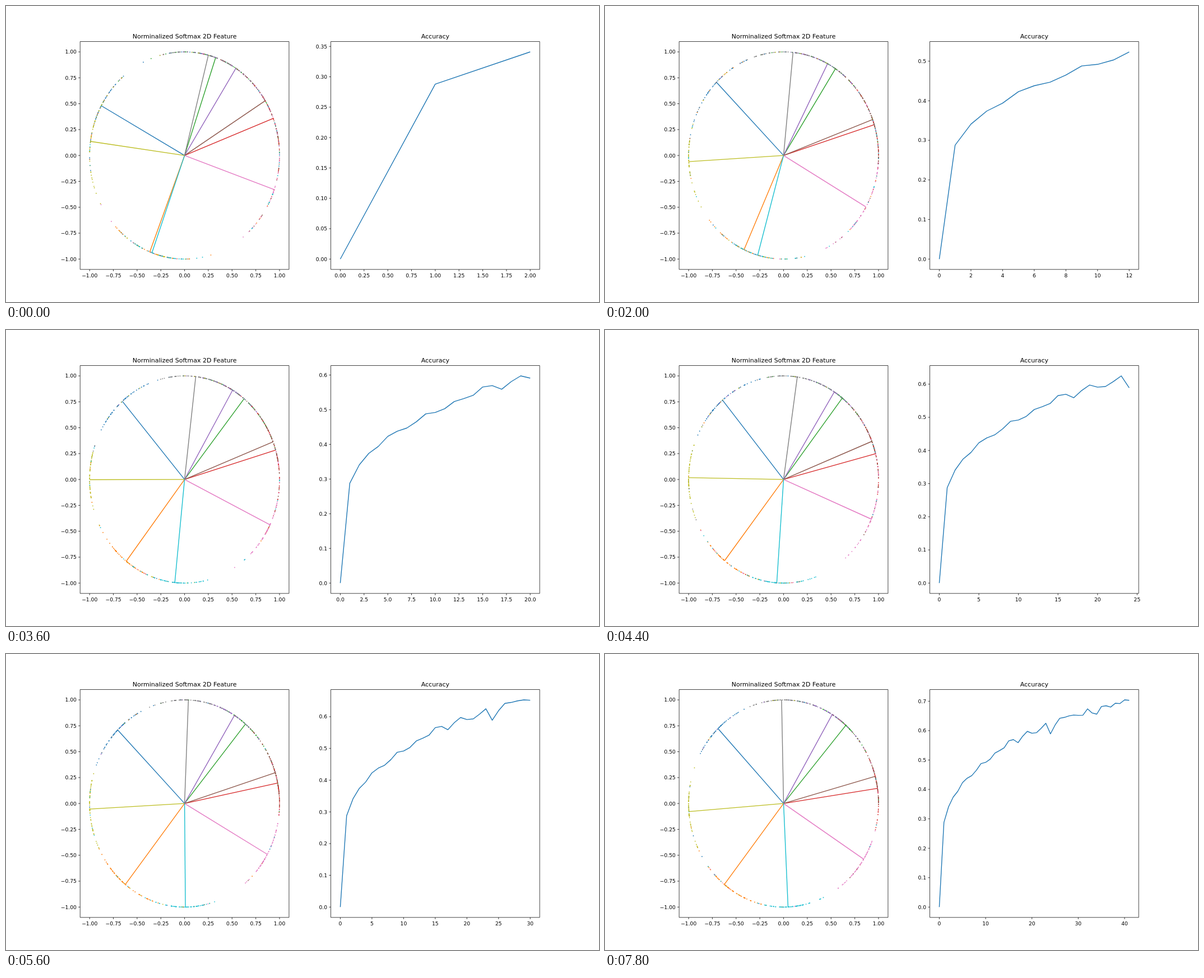
An HTML page with a canvas that plays this animation: 1058x529 px, repeating every 8 s.

```html
<!DOCTYPE html>
<html lang="en">
<head>
<meta charset="utf-8">
<title>Softmax feature training</title>
<style>
  html, body { margin: 0; width: 100%; height: 100%; overflow: hidden; background: #fff; }
  canvas { display: block; }
</style>
</head>
<body>
<canvas id="stage" width="1058" height="529"></canvas>
<script>
const ctx = document.getElementById('stage').getContext('2d');
const STEP_MS = 200, STEPS = 40, POINTS_PER_CLASS = 64;
const PT = 1058 / 16 / 72;                       // one typographic point in pixels
const TOP = 63.5, HEIGHT = 407.3, WIDTH = 372.7;
const LEFT_AXES = 132.25, RIGHT_AXES = 579.5;

const colors = ['#1f77b4', '#ff7f0e', '#2ca02c', '#d62728', '#9467bd',
                '#8c564b', '#e377c2', '#7f7f7f', '#bcbd22', '#17becf'];

// Spoke angles in degrees for each class at the key steps
const keySteps = [0, 10, 14, 22, 28, 33, 39];
const angleKeys = [
  [151.3, 135, 131.9, 130, 134.8, 136.2, 133.7],
  [248.5, 245.4, 232.6, 231.6, 231.4, 228.9, 231.4],
  [70.9, 56.9, 50.6, 51.8, 50.1, 49.8, 49],
  [21, 17.3, 18.6, 14.4, 11.4, 10.9, 8.4],
  [57.3, 62.4, 61.5, 57.7, 58.3, 60.2, 59.2],
  [31.9, 20.3, 21, 21.6, 17.3, 17.9, 15.2],
  [-19.2, -29.8, -29.4, -22.5, -29.4, -32.8, -32.5],
  [75.5, 84.3, 84.8, 81.7, 87.7, 92.2, 91.2],
  [172.2, 183.4, 181.2, 179, 183.1, 182.5, 184.5],
  [249.9, 254.2, 262.3, 265.9, 270.5, 270, 272.7]
];

const accuracy = [
  0, .288, .341, .374, .394, .423, .438, .447, .465, .488, .492, .503, .5235, .532,
  .5415, .5655, .5695, .559, .581, .5975, .591, .593, .608, .625, .589, .619, .642,
  .645, .65, .653, .652, .6525, .674, .66, .656, .682, .6845, .68, .693, .692, .7045, .703
];

function seededRandom(seed) {
  return () => {
    seed = (seed + 0x6D2B79F5) | 0;
    let h = Math.imul(seed ^ (seed >>> 15), 1 | seed);
    h ^= h + Math.imul(h ^ (h >>> 7), 61 | h);
    return ((h ^ (h >>> 14)) >>> 0) / 4294967296;
  };
}

function angleAt(keys, step) {
  let i = 0;
  while (i < keySteps.length - 2 && step > keySteps[i + 1]) i++;
  const u = (step - keySteps[i]) / (keySteps[i + 1] - keySteps[i]);
  return keys[i] + (keys[i + 1] - keys[i]) * u;
}

// Pixel mapping with a 5% margin around the data
function makeScale(left, xMin, xMax, yMin, yMax) {
  return {
    x: v => left + WIDTH * (.05 + (v - xMin) / (xMax - xMin)) / 1.1,
    y: v => TOP + HEIGHT * (1.05 - (v - yMin) / (yMax - yMin)) / 1.1
  };
}

function strokePath(points, color, width) {
  ctx.beginPath();
  points.forEach(([x, y]) => ctx.lineTo(x, y));
  ctx.strokeStyle = color;
  ctx.lineWidth = width;
  ctx.stroke();
}

function text(label, x, y, size, align) {
  ctx.font = `${size * PT}px "DejaVu Sans", sans-serif`;
  ctx.textAlign = align;
  ctx.fillStyle = '#000';
  ctx.fillText(label, x, y);
}

// Smallest "nice" step that needs at most nine intervals
function tickStep(range) {
  const raw = range * 1.1 / 9;
  const power = 10 ** Math.floor(Math.log10(raw));
  return [1, 2, 2.5, 5, 10].find(m => m * power >= raw - 1e-9) * power;
}

function ticks(min, max, step) {
  const digits = [0, 1, 2].find(d => Math.abs(step * 10 ** d - Math.round(step * 10 ** d)) < 1e-6);
  const list = [];
  const end = max + (max - min) * .05;
  for (let i = 0; min + i * step <= end + 1e-9; i++) {
    const value = min + i * step;
    list.push([value, (value < -1e-9 ? '−' : '') + Math.abs(value).toFixed(digits)]);
  }
  return list;
}

function drawAxes(left, title, scale, xTicks, yTicks) {
  const bottom = TOP + HEIGHT, length = 3.5 * PT, line = .8 * PT;
  for (const [value, label] of xTicks) {
    const x = scale.x(value);
    strokePath([[x, bottom], [x, bottom + length]], '#000', line);
    text(label, x, 484.7, 10, 'center');
  }
  for (const [value, label] of yTicks) {
    const y = scale.y(value);
    strokePath([[left, y], [left - length, y]], '#000', line);
    text(label, left - 2 * length, y + 3.4, 10, 'right');
  }
  ctx.strokeStyle = '#000';
  ctx.lineWidth = line;
  ctx.strokeRect(left, TOP, WIDTH, HEIGHT);
  text(title, left + WIDTH / 2, 58.2, 12, 'center');
}

function drawFeatures(step) {
  const scale = makeScale(LEFT_AXES, -1, 1, -1, 1);
  const onCircle = degrees => {
    const a = degrees * Math.PI / 180;
    return [scale.x(Math.cos(a)), scale.y(Math.sin(a))];
  };
  const angles = angleKeys.map(keys => angleAt(keys, step));
  const sorted = [...angles].sort((a, b) => a - b);
  const random = seededRandom(step * 977 + 5);
  const progress = Math.min(1, step / 25);
  const spread = 17 - 7 * progress, confusion = .55 - .37 * progress;

  angles.forEach((angle, k) => {
    ctx.fillStyle = colors[k];
    for (let i = 0; i < POINTS_PER_CLASS; i++) {
      let center = angle;
      if (random() < confusion) {
        const shift = Math.floor(random() * 5) - 2;
        center = sorted[(sorted.indexOf(angle) + shift + 10) % 10];
      }
      const noise = (random() + random() + random() - 1.5) * 2;
      const [x, y] = onCircle(center + noise * spread);
      ctx.beginPath();
      ctx.arc(x, y, .9, 0, 7);
      ctx.fill();
    }
  });
  angles.forEach((angle, k) =>
    strokePath([[scale.x(0), scale.y(0)], onCircle(angle)], colors[k], 1.5 * PT));

  const axisTicks = ticks(-1, 1, .25);
  drawAxes(LEFT_AXES, 'Norminalized Softmax 2D Feature', scale, axisTicks, axisTicks);
}

function drawAccuracy(step) {
  const last = step + 2;
  const values = accuracy.slice(0, last + 1);
  const best = Math.max(...values);
  const scale = makeScale(RIGHT_AXES, 0, last, 0, best);
  strokePath(values.map((v, i) => [scale.x(i), scale.y(v)]), colors[0], 1.5 * PT);
  drawAxes(RIGHT_AXES, 'Accuracy', scale,
    ticks(0, last, tickStep(last)), ticks(0, best, tickStep(best)));
}

let shown = -1;
function render(now) {
  const step = Math.floor(now / STEP_MS) % STEPS;
  if (step !== shown) {
    shown = step;
    ctx.fillStyle = '#fff';
    ctx.fillRect(0, 0, 1058, 529);
    ctx.lineJoin = 'round';
    drawFeatures(step);
    drawAccuracy(step);
  }
  requestAnimationFrame(() => render(performance.now()));
}
render(performance.now());
</script>
</body>
</html>
```
